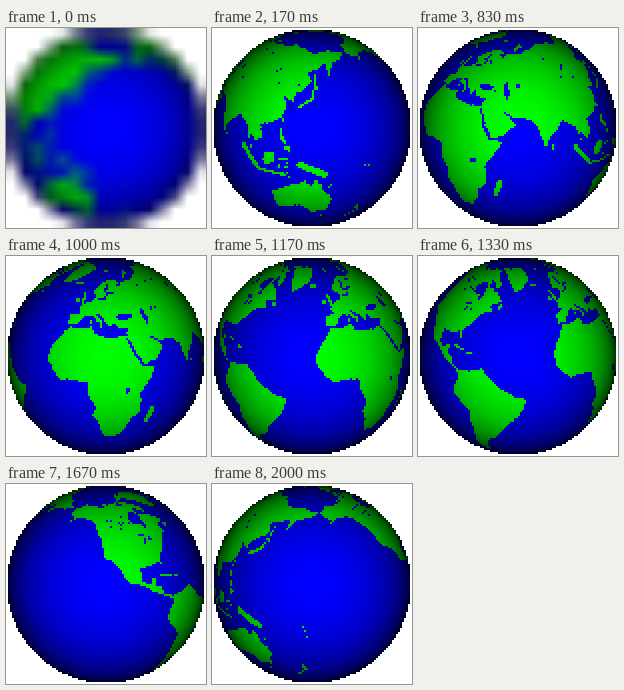
An HTML page with a canvas that plays this animation: 200 by 200 pixels, repeating every 2.17 s.

```html
<!DOCTYPE html>
<html lang="en">
<head>
<meta charset="utf-8">
<title>Rotating globe</title>
<style>
html, body { margin: 0; width: 100%; height: 100%; overflow: hidden; background: #fff; }
canvas { display: block; width: 200px; height: 200px; }
</style>
</head>
<body>
<canvas id="stage" width="200" height="200"></canvas>
<script>
const start = performance.now();
const LOOP = 2170;
const VIEWS = 13;
const RATE = 6 / 1000;      // pictures per millisecond
const STEP = 20;            // degrees per turn of the globe
const FIRST_LON = 160;
const TILT = 20 * Math.PI / 180;
const RADIUS = 0.99;        // relative to half the stage
const AMBIENT = 0.05;
const MAP_W = 720, MAP_H = 360;

function makeCanvas(w, h) {
  const c = document.createElement('canvas');
  c.width = w;
  c.height = h;
  return c;
}

let seed = 7;
function random() {
  seed = (seed * 16807) % 2147483647;
  return seed / 2147483647;
}

// Equirectangular land mask, addressed in degrees.
const map = makeCanvas(MAP_W, MAP_H).getContext('2d', { willReadFrequently: true });
map.lineCap = map.lineJoin = 'round';

// Shapes are drawn twice so that they may cross the date line.
function onMap(drawShape) {
  for (const shift of [0, 360]) {
    map.setTransform(2, 0, 0, -2, (180 - shift) * 2, 180);
    map.beginPath();
    drawShape();
  }
}

function useLand() { map.globalCompositeOperation = 'source-over'; }
function useWater() { map.globalCompositeOperation = 'destination-out'; }

function toPoints(coords) {
  return coords.flatMap((v, i) => i % 2 ? [] : [[v, coords[i + 1]]]);
}

// Splits every edge at a randomly displaced midpoint.
function roughen(points) {
  return points.flatMap(([x, y], i) => {
    const [nx, ny] = points[(i + 1) % points.length];
    const bend = (random() - 0.5) * 0.14;
    return [[x, y], [(x + nx) / 2 - (ny - y) * bend, (y + ny) / 2 + (nx - x) * bend]];
  });
}

function coast(...coords) {
  const points = roughen(roughen(toPoints(coords)));
  onMap(() => {
    points.forEach(p => map.lineTo(...p));
    map.fill();
  });
}

function strip(width, ...coords) {
  map.lineWidth = width;
  onMap(() => {
    toPoints(coords).forEach(p => map.lineTo(...p));
    map.stroke();
  });
}

function oval(lon, lat, w, h, angle = 0) {
  onMap(() => {
    map.ellipse(lon, lat, w / 2, h / 2, angle, 0, 7);
    map.fill();
  });
}

function scatter(count, lon, lat, w, h, size) {
  for (let i = 0; i < count; i++) {
    const s = size * (0.7 + 0.6 * random());
    oval(lon + (random() - 0.5) * w, lat + (random() - 0.5) * h, s / Math.cos(lat * Math.PI / 180), s);
  }
}

function drawContinents() {
  useLand();
  // Africa
  coast(-6,36, 10,37, 11,33, 20,31, 33,31, 38,19, 43,12, 51,12, 40,-4, 41,-15, 35,-20, 33,-27, 26,-34,
    19,-34, 12,-17, 14,-11, 9,0, 9,4, -8,4, -17,14, -17,21, -10,31);
  // Eurasia
  coast(34,31, 39,21, 44,13, 52,16, 59,22, 56,25, 49,30, 57,26, 67,25, 72,20, 77,8, 80,14, 89,22, 97,17,
    103,2, 100,13, 105,9, 109,12, 107,20, 120,25, 122,31, 119,38, 127,35, 128,40, 140,48, 136,54,
    155,60, 156,51, 163,60, 190,66, 170,70, 113,74, 104,77, 73,71, 44,68, 26,71, 12,66, 5,60, 12,57,
    8,54, -4,48, -1,44, -9,43, -9,37, -2,37, 3,43, 14,45, 19,41, 23,37, 26,40, 28,37, 36,36);
  // North America
  coast(-168,66, -156,71, -128,70, -82,69, -78,62, -65,59, -56,53, -66,49, -62,46, -70,43, -76,36,
    -81,31, -80,26, -83,30, -97,28, -97,20, -91,18, -90,21, -87,21, -88,16, -84,15, -83,10, -78,9,
    -78,7, -86,11, -94,16, -105,20, -113,31, -122,36, -124,47, -136,59, -150,60, -162,55, -158,59,
    -165,62);
  // South America
  coast(-77,8, -62,11, -50,0, -35,-6, -39,-17, -48,-26, -57,-37, -65,-42, -68,-54, -73,-52, -73,-38,
    -70,-18, -81,-5, -77,4);
  // Greenland
  coast(-73,78, -33,83, -18,80, -22,71, -43,60, -54,69);
  // Australia
  coast(114,-22, 129,-15, 136,-12, 140,-17, 142,-11, 153,-26, 150,-37, 140,-38, 131,-31, 115,-34);
}

function drawSeas() {
  useWater();
  oval(34, 43, 13, 4);                        // Black Sea
  oval(51, 42, 4, 11, 0.25);                  // Caspian
  oval(60, 45, 3, 3);
  oval(38, 66, 8, 2.5);
  strip(1.6, 12,55, 19,56, 21,59, 29,60);     // Baltic
  strip(2.5, 18,61, 22,65);
  strip(1, 104,52, 109,55);
  oval(33, -1, 3, 3);
  oval(-86, 59.5, 15, 10);                    // Hudson Bay
  oval(-80, 54, 4, 6);
  oval(-88, 47.5, 7, 1.8);                    // Great Lakes
  oval(-87, 43.5, 1.8, 4);
  oval(-82, 44.5, 2.5, 3);
  strip(1, -112,30, -109,25);
  scatter(22, 80, 53, 100, 26, 0.9);
  scatter(16, -104, 60, 34, 16, 1);
}

function drawIslands() {
  useLand();
  strip(2, 10,44, 16,40, 16,38);              // Italy
  strip(1.2, 9,39, 9,43);
  strip(3, -2,51, -3,57);                     // British Isles
  oval(-8, 53, 4, 3);
  oval(-19, 65, 10, 2.5);
  strip(3, 53,71, 58,74, 66,76);
  oval(18, 79, 14, 3);
  strip(3.5, 46,-23, 49,-14);                 // Madagascar
  oval(81, 7.5, 2, 3);
  strip(1.8, 131,32, 136,35, 140,37, 141,41); // Japan
  oval(143, 43.5, 4, 2.5);
  strip(1.5, 142,46, 143,53);
  oval(121, 23.5, 1.5, 3);
  strip(2, 121,18, 121,14, 124,11);           // Philippines
  oval(125, 7.5, 3.5, 3.5);
  strip(3, 96,5, 105,-5);                     // Sumatra and Java
  strip(1.4, 106,-7, 114,-8, 124,-9);
  oval(114, 0.5, 7, 9, -0.6);                 // Borneo
  strip(1.2, 120,-5, 120,0, 125,1);
  strip(4, 133,-2, 140,-5, 147,-8);           // New Guinea
  strip(2.5, 174,-36, 176,-40);               // New Zealand
  strip(2.2, 173,-42, 168,-46);
  oval(147, -42, 3, 2.5);
  strip(1.4, -84,22, -76,20);                 // Antilles
  oval(-71, 19, 4.5, 1.6);
  oval(-56, 49, 5, 3);
  strip(5, -66,64, -74,69, -86,72);           // Arctic islands
  strip(4, -116,71, -105,71);
  strip(4, -88,78, -72,81);
  scatter(12, -103, 75, 44, 5, 1.6);
  scatter(14, 124, -3, 14, 16, 0.9);
  scatter(12, 163, -12, 30, 14, 0.9);
}

drawContinents();
drawSeas();
drawIslands();
const mask = map.getImageData(0, 0, MAP_W, MAP_H).data;

function isLand(lon, lat) {
  const x = Math.floor((lon + 540) % 360 * 2);
  const y = Math.min(MAP_H - 1, Math.floor((90 - lat) * 2));
  return mask[(y * MAP_W + x) * 4 + 3] > 127;
}

// Orthographic view; x and y run from -1 to 1 with y upwards.
function colorAt(x, y, centerLon) {
  x /= RADIUS;
  y /= RADIUS;
  const d = x * x + y * y;
  if (d >= 1) return [255, 255, 255];
  const z = Math.sqrt(1 - d);
  const up = y * Math.cos(TILT) + z * Math.sin(TILT);
  const out = z * Math.cos(TILT) - y * Math.sin(TILT);
  const lat = Math.asin(Math.max(-1, Math.min(1, up))) * 180 / Math.PI;
  const lon = centerLon + Math.atan2(x, out) * 180 / Math.PI;
  const light = 255 * (AMBIENT + (1 - AMBIENT) * z);
  return isLand(lon, lat) ? [0, light, 0] : [0, 0, light];
}

function renderGlobe(size, samples, centerLon) {
  const canvas = makeCanvas(size, size);
  const ctx = canvas.getContext('2d');
  const image = ctx.createImageData(size, size);
  const fine = size * samples;
  for (let i = 0; i < size * size; i++) {
    const sum = [0, 0, 0];
    for (let s = 0; s < samples * samples; s++) {
      const px = (i % size) * samples + s % samples + 0.5;
      const py = Math.floor(i / size) * samples + Math.floor(s / samples) + 0.5;
      colorAt(px / fine * 2 - 1, 1 - py / fine * 2, centerLon).forEach((v, c) => sum[c] += v);
    }
    sum.forEach((v, c) => image.data[i * 4 + c] = v / (samples * samples));
    image.data[i * 4 + 3] = 255;
  }
  ctx.putImageData(image, 0, 0);
  return canvas;
}

// The globe lingers on its first turns, then runs at one turn per 100 ms.
function turnAt(index) {
  return Math.max(Math.min(index, 4), Math.floor((index / RATE - 250) / 100));
}

// The loop opens on a soft, coarse preview.
const views = Array.from({ length: VIEWS }, (_, i) => {
  const lon = FIRST_LON - turnAt(i) * STEP;
  return i === 0 ? renderGlobe(16, 6, lon) : renderGlobe(100, 1, lon);
});

const stage = document.getElementById('stage').getContext('2d');

function draw() {
  const t = (performance.now() - start) % LOOP;
  const index = Math.min(VIEWS - 1, Math.floor((t + 4) * RATE));
  stage.imageSmoothingEnabled = index === 0;
  stage.drawImage(views[index], 0, 0, 200, 200);
  requestAnimationFrame(draw);
}
draw();
</script>
</body>
</html>
```
